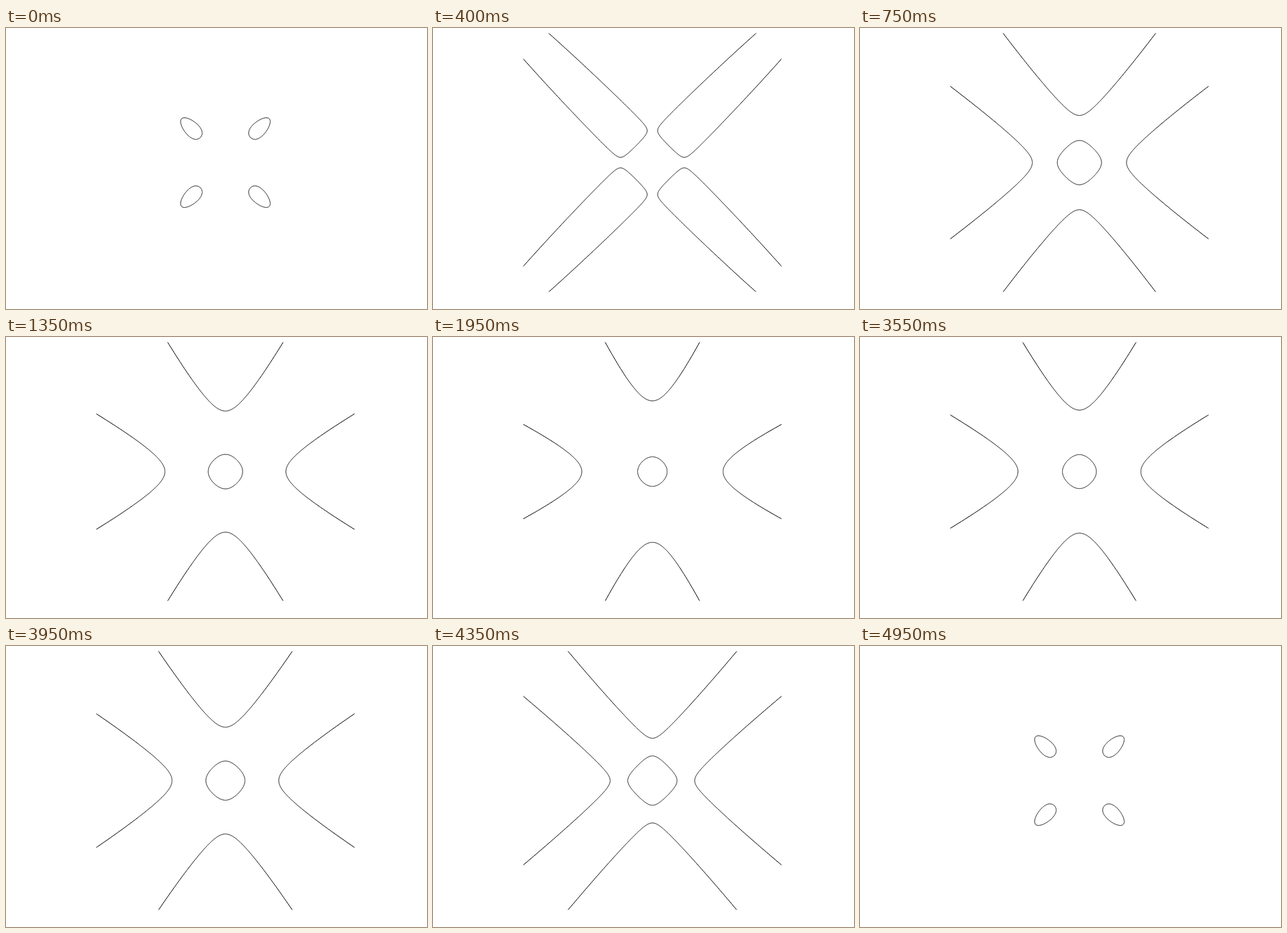
Recreate the animation shown at these times as an HTML page with a canvas. Size 600 by 400 pixels, loop 5 s.

```html
<!DOCTYPE html>
<html lang="en">
<head>
<meta charset="utf-8">
<title>Quartic family</title>
<style>
html, body { margin: 0; width: 100%; height: 100%; overflow: hidden; background: #fff; }
canvas { display: block; }
</style>
</head>
<body>
<canvas id="stage" width="600" height="400"></canvas>
<script>
// Curve: x^4 + y^4 + 1 = k (x^2 y^2 + x^2 + y^2), k running 1.1 .. 6 and back
const ctx = document.getElementById('stage').getContext('2d');
const CX = 312.7, CY = 191.6, UNIT = 46, HALF = 4 * UNIT;
const STEP_MS = 50, STEPS = 100, SAMPLES = 800;

// Solving in polar form gives r^2 = 2 / (k + sign * q(angle))
function traceBranch(k, sign, turn) {
  const start = k < 2 ? Math.asin(Math.sqrt(2 - k)) / 2 : 0;
  let penDown = false;
  for (let i = 0; i <= SAMPLES; i++) {
    // Cosine spacing puts more samples at the ends of the quadrant
    const angle = Math.PI / 4 - (Math.PI / 4 - start) * Math.cos(Math.PI * i / SAMPLES);
    const q = Math.sqrt(Math.max(0, k * k - 4 + (k + 2) * Math.sin(2 * angle) ** 2));
    const denom = k + sign * q;
    if (denom < 1e-6) { penDown = false; continue; }
    const r = UNIT * Math.sqrt(2 / denom);
    const x = CX + r * Math.cos(angle + turn), y = CY + r * Math.sin(angle + turn);
    if (penDown) ctx.lineTo(x, y); else ctx.moveTo(x, y);
    penDown = true;
  }
}

function draw(k) {
  ctx.fillStyle = '#fff';
  ctx.fillRect(0, 0, 600, 400);
  ctx.save();
  ctx.beginPath();
  ctx.rect(CX - HALF, CY - HALF, 2 * HALF, 2 * HALF);
  ctx.clip();
  ctx.beginPath();
  for (let quadrant = 0; quadrant < 4; quadrant++) {
    traceBranch(k, 1, quadrant * Math.PI / 2);
    traceBranch(k, -1, quadrant * Math.PI / 2);
  }
  ctx.strokeStyle = '#000';
  ctx.lineWidth = 1;
  ctx.lineJoin = 'round';
  ctx.stroke();
  ctx.restore();
}

function tick() {
  const step = Math.floor(performance.now() / STEP_MS) % STEPS;
  draw((11 + Math.min(step, STEPS - 1 - step)) / 10);
  requestAnimationFrame(tick);
}
tick();
</script>
</body>
</html>
```
